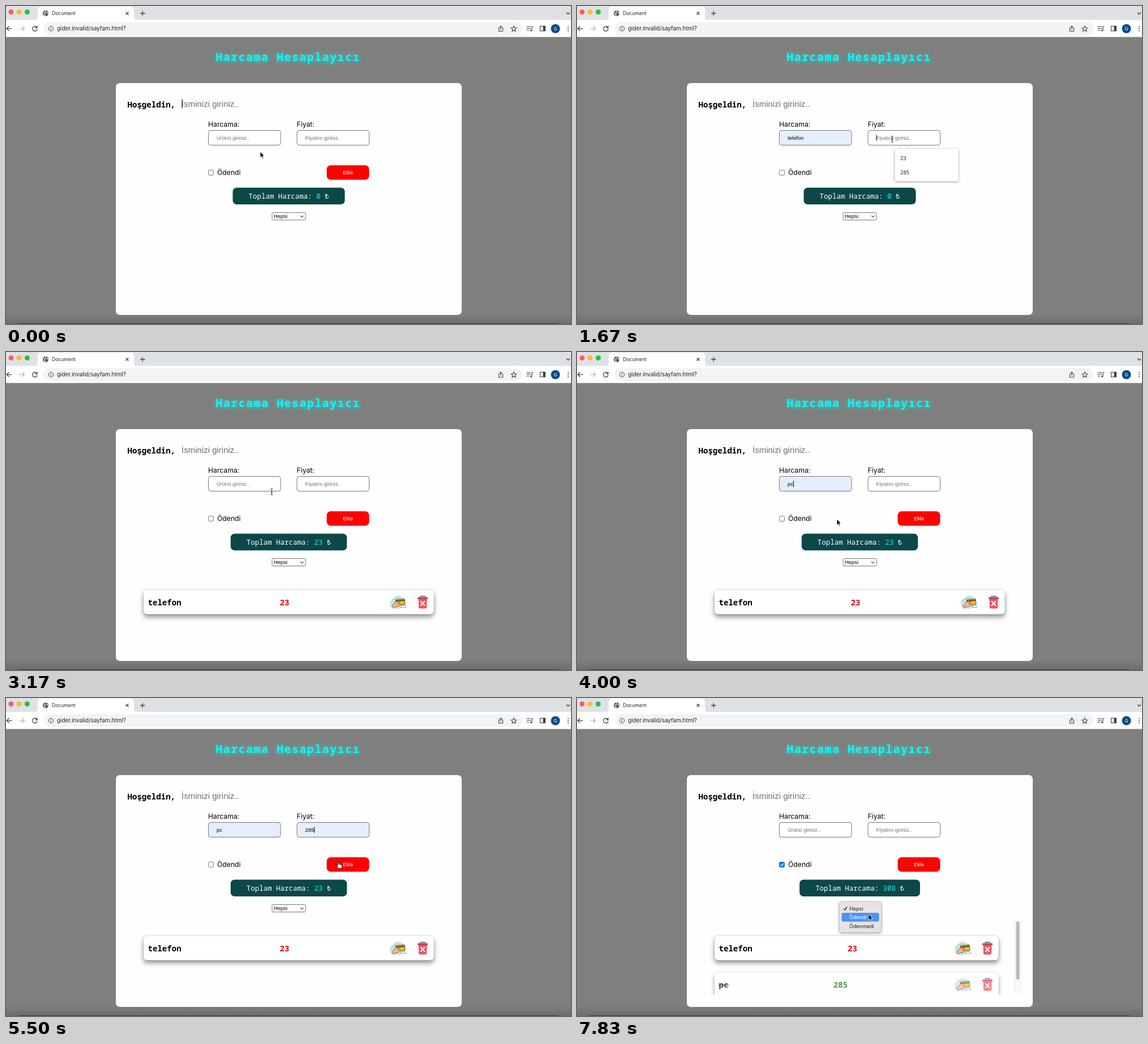
Recreate the animation shown at these times as an HTML page. Size 998 by 561 pixels, loop 8 s.

```html
<!DOCTYPE html>
<html lang="tr">
<head>
<meta charset="utf-8">
<title>Document</title>
<style>
  html, body { margin: 0; width: 100%; height: 100%; overflow: hidden; background: #7f7f7d; }
  svg { display: block; width: 998px; height: 561px; }
  .ui { font: 8.6px Inter, sans-serif; fill: #202124; }
  .label { font: 12.2px Inter, sans-serif; fill: #000; }
  .form { font: 9.4px "Liberation Sans", sans-serif; fill: #000; }
  .hint { fill: #6f6f6f; }
  .mono { font: 700 14.1px "Noto Sans Mono", monospace; }
  .total { font: 12.45px "Noto Sans Mono", monospace; fill: #fff; white-space: pre; }
  .title { font: 600 19.4px "Noto Sans Mono", monospace; letter-spacing: 1.82px; fill: #0ff;
           filter: drop-shadow(0 1px 4px rgba(0,255,255,.75)); }
  .line { fill: none; stroke: #3f4347; stroke-width: 1.3; }
  .row { filter: drop-shadow(0 0 2px rgba(0,0,0,.14)) drop-shadow(0 5px 4px rgba(0,0,0,.42)); }
  .pop { filter: drop-shadow(0 1px 2px rgba(0,0,0,.4)); }
</style>
</head>
<body>
<svg viewBox="0 0 998 561">
  <defs>
    <linearGradient id="floor" x2="0" y2="1">
      <stop offset="0" stop-color="#555" stop-opacity="0"/>
      <stop offset="1" stop-color="#555" stop-opacity=".45"/>
    </linearGradient>
    <clipPath id="listClip"><path d="M214 393H786V524H214z"/></clipPath>

    <g id="pay">
      <path d="M-14 2C-16-4-9-5-8-8C-4-13 4-12 7-9C13-8 13-4 12-2C16 2 13 8 8 8C5 13-4 12-7 10C-12 11-15 7-14 2z" fill="#bfe7e2"/>
      <path d="M-10-2q1-4 5-3q2-4 6-1" fill="#fff" stroke="#667" stroke-width=".6"/>
      <path d="M6 7q3-3 5-1q4 0 3 3H5z" fill="#fff" stroke="#667" stroke-width=".6"/>
      <g transform="rotate(-5)">
        <rect x="-4" y="-5" width="16" height="10" rx="1.4" fill="#f8b91c" stroke="#54411f" stroke-width=".8"/>
        <path d="M-4-2.5H12" stroke="#55451f" stroke-width="2"/>
      </g>
      <path d="M-11 7L-5 0Q-2-3 2-1Q3 1-1 2L4 3Q6 5 2 6Q-2 9-5 8L-8 11z" fill="#f5b58e" stroke="#6b4638" stroke-width=".8"/>
    </g>
    <g id="bin">
      <circle r="11" fill="none" stroke="#cfe0f4" stroke-width="1.5" stroke-dasharray="1.5 2"/>
      <path d="M-7.500-6H7.500L7 8.500Q7 11 4.500 11H-4.500Q-7 11-7 8.500z" fill="#f5535f"/>
      <path d="M-4-9V-10.500H4V-9" fill="none" stroke="#6b5562" stroke-width="1.3"/>
      <rect x="-9" y="-9" width="18" height="3.600" rx="1.2" fill="#b9485a"/>
      <path d="M-3.300-1.500L3.300 5.500M3.300-1.500L-3.300 5.500" stroke="#fff" stroke-width="1.9" stroke-linecap="round"/>
    </g>
    <path id="arrow" d="M0 0V10.400L2.400 8.200L4 11.800L5.800 11L4.200 7.500H7.400z" fill="#000" stroke="#fff" stroke-width=".8"/>
    <path id="hand" d="M-1 1Q0-.5 1.200 1V4.300Q3 3.600 3.300 4.700Q5 4.300 5.200 5.400Q6.700 5.200 6.500 7Q6.500 9.500 5.300 11.800H.200L-3 7.500Q-2.800 5.800-1 7z" fill="#fff" stroke="#000" stroke-width=".9"/>
    <path id="beam" d="M-2-5Q0-5 0-4Q0-5 2-5M0-4V5M-2 6Q0 6 0 5Q0 6 2 6M-1.500 2H1.500" fill="none" stroke="#222" stroke-width=".9"/>
  </defs>

  <!-- browser window -->
  <rect width="998" height="561" fill="#7f7f7d"/>
  <rect y="543" width="998" height="18" fill="url(#floor)"/>
  <path d="M22 560.500H976" stroke="#383838"/>
  <rect width="998" height="25" fill="#dee1e6"/>
  <rect y="24.500" width="998" height="30" fill="#fff"/>
  <path d="M50 25Q56 25 56 19V7Q56 1 62 1H220Q226 1 226 7V19Q226 25 232 25z" fill="#fff"/>
  <path d="M0 54.500H998" stroke="#d5d7da"/>
  <circle cx="9" cy="10.500" r="4.500" fill="#fe5f57"/>
  <circle cx="23" cy="10.500" r="4.500" fill="#febc2e"/>
  <circle cx="37.500" cy="10.500" r="4.500" fill="#28c13f"/>
  <circle cx="70" cy="13" r="5" fill="#4b4f53"/>
  <path d="M66 11.500L69 13L68 15.500L70 17M69.500 8.500L70 11L73 11.500L74.500 14" fill="none" stroke="#fff" stroke-width="1.2"/>
  <text class="ui" x="81" y="16">Document</text>
  <path class="line" d="M211.500 10.500l5 5m0-5l-5 5M237 13h8.500M241.200 8.700v8.600M990 11.500l3 3l3-3"/>
  <path class="line" d="M10.500 39.800H1.500M5.500 35.500L1.300 39.800L5.500 44"/>
  <path class="line" d="M23.500 39.800H32.500M28.500 35.500L32.700 39.800L28.500 44" style="stroke:#b3b6ba"/>
  <path class="line" d="M54.300 37.300A4.300 4.300 0 1 0 55.200 41M55 35V38.500H51.500"/>
  <rect x="67" y="28.500" width="845" height="22.500" rx="11.200" fill="#f1f3f4"/>
  <circle class="line" cx="79.500" cy="40" r="4.200" style="stroke-width:1"/>
  <path class="line" d="M79.500 39.300V42.300M79.500 37.300V38.400" style="stroke-width:1"/>
  <text class="ui" x="90" y="43.300" style="font-size:9.9px">gider.invalid/sayfam.html?</text>
  <g class="line" style="stroke-width:1.1">
    <path d="M872 38.500H870.500V44.500H877.500V38.500H876M874 42V35.500M872 37.300L874 35.300L876 37.300"/>
    <path d="M897 35.300l1.400 3.200l3.400.3l-2.600 2.300l.8 3.400l-3-1.800l-3 1.800l.8-3.400l-2.600-2.300l3.400-.3z"/>
    <path d="M919.500 36.500H927M919.500 39.500H927M919.500 42.500H924M929 43V36.500H931.500"/>
    <rect x="943.500" y="35.500" width="9" height="8.500"/>
  </g>
  <circle cx="927.600" cy="43" r="1.600" fill="#3f4347"/>
  <path d="M948.500 35.500H952.500V44H948.500z" fill="#3f4347"/>
  <circle cx="970.500" cy="40" r="8" fill="#0b4a8c"/>
  <text class="ui" x="970.500" y="43" text-anchor="middle" style="fill:#fff;font-size:8px">G</text>
  <path d="M993 36.300v.01M993 40v.01M993 43.700v.01" stroke="#3f4347" stroke-width="2" stroke-linecap="round"/>

  <!-- page -->
  <text class="title" x="370.500" y="96.500">Harcama Hesaplayıcı</text>
  <rect x="194" y="136" width="611" height="409" rx="7" fill="#fefefe"/>
  <text class="mono" x="214.500" y="178.500">Hoşgeldin,</text>
  <text class="form hint" x="310" y="177.500" style="font-size:15px">İsminizi giriniz..</text>
  <text class="label" x="357" y="213">Harcama:</text>
  <text class="label" x="513.500" y="213">Fiyat:</text>
  <text class="label" x="373" y="298.200">Ödendi</text>
  <rect x="566.500" y="281" width="75" height="25.500" rx="7" fill="#f00"/>
  <text class="form" x="604" y="297" text-anchor="middle" style="fill:#fff">Ekle</text>
  <rect x="470" y="364.500" width="59" height="13" rx="1.500" fill="#fff" stroke="#767676"/>
  <text class="form" x="473" y="374.300">Hepsi</text>
  <path class="line" d="M520 369.800l2.700 2.700l2.700-2.700" style="stroke-width:1.100"/>
  <g id="live"></g>
</svg>

<script>
const LOOP = 8000, FPS = 6;
const live = document.getElementById('live');
const pen = document.createElement('canvas').getContext('2d');
pen.font = '9.4px "Liberation Sans", sans-serif';

// Pointer path: time, x, y
const path = [
  [0, 449, 257], [170, 449, 257], [500, 430, 234], [670, 430, 235], [1000, 454, 266],
  [1170, 454, 267], [1600, 556, 234], [1830, 560, 236], [2000, 583, 268], [2170, 583, 269],
  [2500, 590, 291], [2830, 590, 291], [3300, 440, 235], [3500, 440, 236], [3830, 459, 293],
  [4000, 459, 295], [4600, 570, 234], [4900, 570, 236], [5330, 587, 288], [5500, 587, 289],
  [6000, 362, 293], [6170, 362, 294], [6500, 615, 299], [6670, 615, 299], [7170, 505, 370],
  [7400, 505, 371], [7830, 515, 381.5], [8000, 515, 381.5]
];
const fields = [
  { x: 357, hint: 'Ürünü giriniz..', options: ['telefon', 'pc'],
    open: [[500, 1170], [3330, 4000]], filled: [[1170, 2670, 'telefon'], [4000, 6500, 'pc']],
    focus: [[500, 1670], [3330, 4670]] },
  { x: 513.5, hint: 'Fiyatını giriniz..', options: ['23', '285'],
    open: [[1670, 2170], [4670, 5500]], filled: [[2170, 2670, '23'], [5500, 6500, '285']],
    focus: [[1670, 2500], [4670, 6000]] }
];
const ADD_FIRST = 2670, CHECK = 6000, ADD_SECOND = 6500, MENU = 7330;

const during = (spans, t) => spans.find(([a, b]) => t >= a - 6 && t < b - 6);
const after = (mark, t) => t >= mark - 6;
const rect = (x, y, w, h, r, attrs) =>
  `<rect x="${x}" y="${y}" width="${w}" height="${h}" rx="${r}" ${attrs}/>`;
const text = (cls, x, y, str, attrs = '') =>
  `<text class="${cls}" x="${x}" y="${y}" ${attrs}>${str}</text>`;
const use = (id, x, y) => `<use href="#${id}" x="${x}" y="${y}"/>`;
const caret = (x, y, h) => `<path d="M${x} ${y}v${h}" stroke="#000"/>`;

function pointer(t) {
  const i = Math.max(1, path.findIndex(p => p[0] > t));
  const [t0, x0, y0] = path[i - 1], [t1, x1, y1] = path[i];
  const u = (t - t0) / (t1 - t0), e = u * u * (3 - 2 * u);
  return { x: x0 + (x1 - x0) * e, y: y0 + (y1 - y0) * e };
}

function field(f, t, hover) {
  const done = during(f.filled, t);
  const value = done ? done[2] : during(f.open, t) && f.options[hover];
  let out = rect(f.x + .5, 219.5, 127.5, 26, 4, `fill="${value ? '#e5eefc' : '#fff'}" stroke="#767676"`)
    + text(value ? 'form' : 'form hint', f.x + 15, 236, value || f.hint);
  if (during(f.focus, t)) out += caret(f.x + 15.5 + (done ? pen.measureText(value).width : 0), 227, 11);
  return out;
}

function suggestions(f, hover) {
  const x = f.x + 48;
  return `<path class="pop" d="M${x} 252h10l6-5l6 5h90v55q0 2-2 2h-108q-2 0-2-2z" fill="#fff"/>`
    + f.options.map((word, i) =>
      (i === hover ? rect(x, 255 + i * 25.5, 112, 25.5, 0, 'fill="#e4e4e4"') : '')
      + text('ui', x + 9.5, 271.5 + i * 25.5, word)).join('');
}

function total(sum) {
  const w = (18 + String(sum).length) * 7.47 + 56;
  return rect(499.5 - w / 2, 320.5, w, 29.5, 7, 'fill="#0b4847"')
    + text('total', 499.5, 340.3, `Toplam Harcama: <tspan fill="#22e6f0">${sum}</tspan> ₺`, 'text-anchor="middle"');
}

function row(y, right, name, price, priceX, paid) {
  const fill = paid ? '#006f00' : '#e60012';
  return `<g opacity="${paid ? .7 : 1}">` + rect(243, y, right - 243, 42.5, 6, 'class="row" fill="#fff"')
    + text('mono', 250.5, y + 27, name)
    + (paid ? `<path d="M250 ${y + 22.5}h18" stroke="#000" stroke-width="1.4"/>` : '')
    + text('mono', priceX, y + 27, price, `text-anchor="middle" fill="${fill}"`)
    + use('pay', right - 63, y + 21.5) + use('bin', right - 19.5, y + 21.5) + '</g>';
}

function list(t) {
  if (!after(ADD_FIRST, t)) return '';
  const two = after(ADD_SECOND, t), right = two ? 744.5 : 755.5;
  return '<g clip-path="url(#listClip)">'
    + row(420, right, 'telefon', 23, two ? 486.5 : 492, false)
    + (two ? row(484, right, 'pc', 285, 465.5, true)
      + rect(773.5, 392, 10.5, 134, 0, 'fill="#fafafa" stroke="#ececec"')
      + rect(775.7, 394, 6, 103, 3, 'fill="#b9b9b9"') : '')
    + '</g>';
}

function menu(y) {
  const active = y > 379 ? 1 : 0;
  return rect(463.5, 359.5, 74, 54, 4, 'class="pop" fill="#e9e2e4" stroke="#c9c3c5" stroke-width=".7"')
    + rect(467.5, 363.5 + active * 15.5, 66, 15.5, 3, 'fill="#4a94f8"')
    + ['Hepsi', 'Ödendi', 'Ödenmedi'].map((word, i) =>
      text('ui', 481, 374.5 + i * 15.5, word, `style="font-size:9px;fill:${i === active ? '#fff' : '#222'}"`)).join('')
    + `<path d="M471 371.500l2.200 2.700l4-6" fill="none" stroke="${active ? '#222' : '#fff'}" stroke-width="1.300"/>`;
}

function checkbox(on) {
  return rect(357.5, 289.5, 9, 9, 1.8, on ? 'fill="#0a6fe8" stroke="#0a6fe8"' : 'fill="#fff" stroke="#767676"')
    + (on ? '<path d="M359.500 294.200l2 2l3.500-4.400" fill="none" stroke="#fff" stroke-width="1.400"/>' : '');
}

function cursor({ x, y }, covered) {
  const inside = (l, r, top, bottom) => x > l && x < r && y > top && y < bottom;
  const typing = inside(357, 485, 219, 246) || inside(513, 641, 219, 246);
  const pressing = !covered && inside(566, 642, 281, 307);
  return use(typing ? 'beam' : pressing ? 'hand' : 'arrow', x, y);
}

function scene(t) {
  const at = pointer(t);
  const hover = Math.floor((at.y - 255) / 25.5);
  const open = fields.find(f => during(f.open, t));
  const sum = after(ADD_SECOND, t) ? 308 : after(ADD_FIRST, t) ? 23 : 0;
  return (t < 494 ? caret(311, 164.5, 16) : '')
    + fields.map(f => field(f, t, hover)).join('')
    + checkbox(after(CHECK, t)) + total(sum) + list(t)
    + (open ? suggestions(open, hover) : '')
    + (after(MENU, t) ? menu(at.y) : '')
    + cursor(at, open);
}

let shown = -1;
function tick() {
  const step = Math.floor((performance.now() % LOOP + 5) * FPS / 1000) % (LOOP * FPS / 1000);
  if (step !== shown) live.innerHTML = scene((shown = step) * 1000 / FPS);
  requestAnimationFrame(tick);
}
tick();
</script>
</body>
</html>
```
